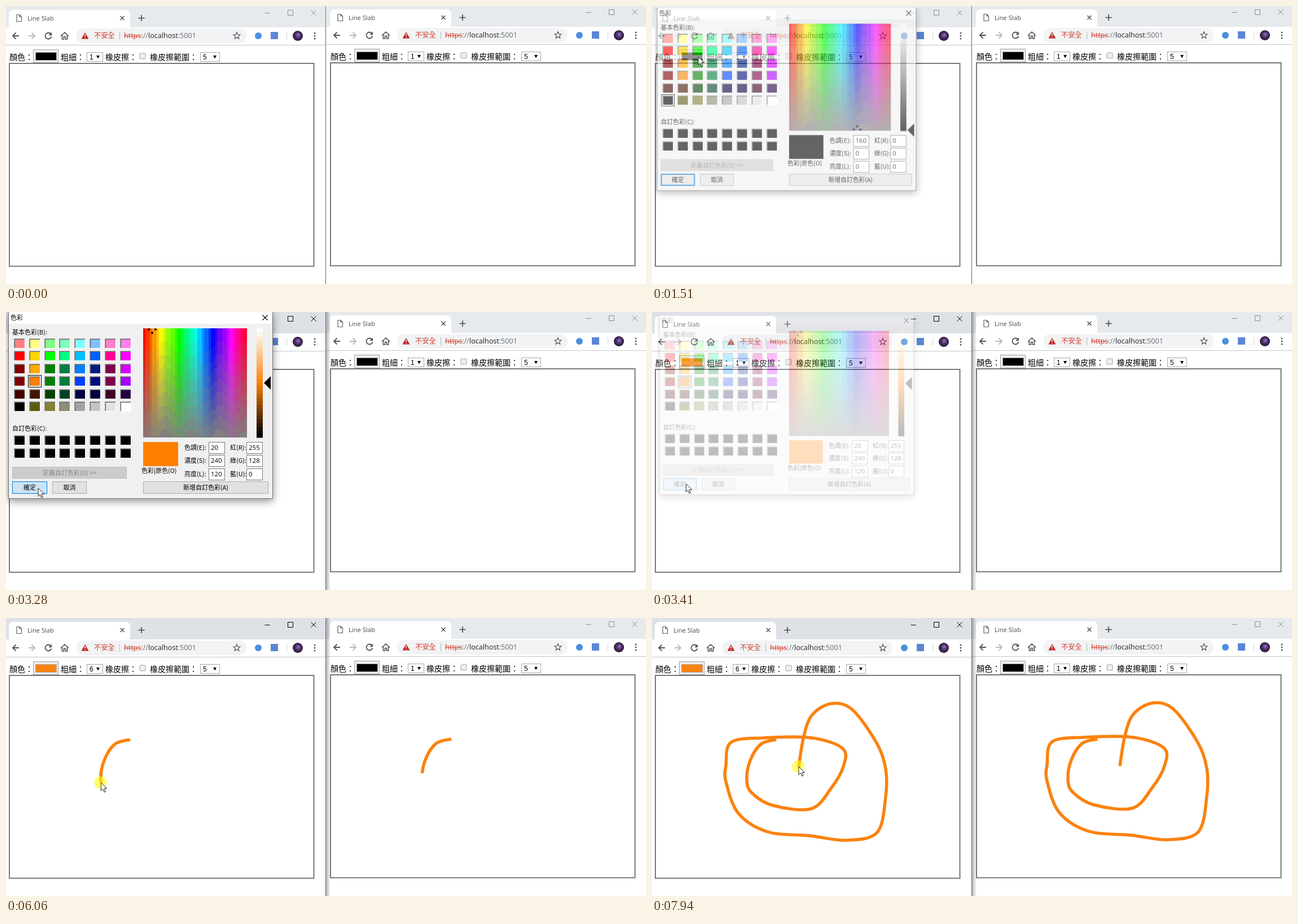
An HTML page with a canvas that plays this animation: 1134 px wide and 494 px high, repeating every 8 s.

```html
<!DOCTYPE html>
<html lang="zh-Hant">
<head>
<meta charset="utf-8">
<title>Line Slab</title>
<style>
  html, body { margin: 0; width: 100%; height: 100%; overflow: hidden; background: #fff; }
  canvas { display: block; }
  svg { position: absolute; left: 0; top: 0; }
</style>
</head>
<body>
<canvas id="stage" width="1134" height="494"></canvas>
<svg width="0" height="0"><path id="trail" fill="none"/></svg>
<script>
const stage = document.getElementById('stage').getContext('2d');
const layer = Object.assign(document.createElement('canvas'), { width: 566, height: 494 }).getContext('2d');
let ctx = stage;

const LOOP = 8000;
const CJK = '"Noto Sans CJK TC", "Noto Sans CJK", "Noto Sans CJK JP", sans-serif';
const UI = '"Open Sans", "Noto Sans", sans-serif';
const ARIAL = '"Liberation Sans", Arial, sans-serif';
const ORANGE = '#fb820f', INK = '#505357';

// Times of the events in ms
const APPEAR = 260, PRESS = 1290, FADE_IN = 1420, PICK = 2200, CLOSE = 3300, FADE = 150;
const OPEN_LIST = 4200, CHOOSE = 4940, DRAW = 5770, DRAW_END = 7900, LAG = 35, CLICK = 80;

// Cursor moves: start, end, x, y
const MOVES = [
  [APPEAR, 820, 82, 90], [1560, 1690, 106, 147], [1690, 2060, 51, 123], [2330, 2900, 57, 313],
  [3340, 3970, 149, 94], [4390, 4430, 157, 121], [4430, 4660, 158, 178], [5020, 5730, 220, 216]
];

// Key points of the hand-drawn line
const KNOTS = `220,216 193,224 174,253 168,288 177,311 214,333 282,339 317,303 339,264 338,232
  283,213 198,213 140,221 131,262 131,291 153,347 205,380 280,387 345,395 399,381 414,318
  414,268 398,222 355,163 318,152 284,172 269,210 260,264`
  .split(/\s+/).map(p => p.split(',').map(Number));

const clamp = v => Math.max(0, Math.min(1, v));
const smooth = v => v * v * (3 - 2 * v);
const mix = (a, b, k) => a + (b - a) * k;

// Catmull-Rom spline as Bezier segments
function spline(points) {
  const at = i => points[Math.max(0, Math.min(points.length - 1, i))];
  const handle = (i, sign) => at(i).map((v, k) => v + sign * (at(i + 1)[k] - at(i - 1)[k]) / 6);
  return points.slice(1).reduce((d, p, i) => `${d}C${handle(i, 1)} ${handle(i + 1, -1)} ${p}`, 'M' + points[0]);
}
const trail = document.getElementById('trail');
const trailShape = spline(KNOTS);
trail.setAttribute('d', trailShape);
const trailPath = new Path2D(trailShape), trailLength = trail.getTotalLength();
const drawnLength = t => trailLength * clamp((t - DRAW) / (DRAW_END - DRAW)) ** 1.3;

function cursorAt(t) {
  if (t >= DRAW) {
    const p = trail.getPointAtLength(drawnLength(t));
    return [p.x, p.y];
  }
  let x = 911, y = 478;
  for (const [from, to, tx, ty] of MOVES) {
    const k = smooth(clamp((t - from) / (to - from)));
    x = mix(x, tx, k);
    y = mix(y, ty, k);
  }
  return [x, y];
}

function rect(x, y, w, h, fill, border) {
  ctx.fillStyle = fill;
  ctx.fillRect(x, y, w, h);
  if (!border) return;
  ctx.strokeStyle = border;
  ctx.lineWidth = 1;
  ctx.strokeRect(x + .5, y + .5, w - 1, h - 1);
}
function round(x, y, w, h, r, fill) {
  ctx.beginPath();
  ctx.roundRect(x, y, w, h, r);
  ctx.fillStyle = fill;
  ctx.fill();
}
function path(d, x, y, stroke, width = 1, fill) {
  const p = new Path2D(d);
  ctx.save();
  ctx.translate(x, y);
  if (fill) { ctx.fillStyle = fill; ctx.fill(p); }
  if (stroke) { ctx.strokeStyle = stroke; ctx.lineWidth = width; ctx.stroke(p); }
  ctx.restore();
}
function disc(x, y, r, fill) {
  ctx.beginPath();
  ctx.arc(x, y, r, 0, 7);
  ctx.fillStyle = fill;
  ctx.fill();
}
function cross(x, y, r, color, width) {
  path(`M${-r} ${-r}L${r} ${r}M${r} ${-r}L${-r} ${r}`, x, y, color, width);
}
function star(x, y) {
  let d = '';
  for (let i = 0; i < 10; i++) {
    const r = i % 2 ? 2.8 : 6.3, a = i * Math.PI / 5;
    d += `${i ? 'L' : 'M'}${r * Math.sin(a)} ${-r * Math.cos(a)}`;
  }
  path(d + 'z', x, y, INK, 1.2);
}
function text(s, x, y, size, color = '#000', family = CJK, align = 'left') {
  ctx.font = `${size}px ${family}`;
  ctx.fillStyle = color;
  ctx.textAlign = align;
  ctx.fillText(s, x, y + size * .37);
}

function select(x, w, value, border = '#a6a6a6') {
  rect(x, 82, w, 17, '#fff', border);
  text(value, x + 5, 90.5, 12, '#000', ARIAL);
  path('M-3-2.5h6L0 3z', x + w - 9, 90.5, null, 0, '#000');
}

function addressBar() {
  const arrow = 'M6 0H-5M.5-5.5L-5 0L.5 5.5';
  path(arrow, 17, 53, INK, 1.8);
  ctx.save();
  ctx.scale(-1, 1);
  path(arrow, -46, 53, '#b8babd', 1.8);
  ctx.restore();
  path('M4.2-3.6A5.5 5.5 0 1 0 5.4 1.2', 75, 53, INK, 1.8);
  path('M6-6.5V-.8H.3z', 75, 53, null, 0, INK);
  path('M-7 .5L0-6L7 .5M-4.6-1V6H-1.5V1.5H1.5V6H4.6V-1', 104, 53, INK, 1.6);
  round(124, 40, 302, 26, 13, '#f1f3f4');
  path('M0-6L6.5 5.5H-6.5z', 140, 53, null, 0, '#c5221f');
  rect(139.3, 50, 1.5, 4, '#fff');
  rect(139.3, 55.5, 1.5, 1.5, '#fff');
  text('不安全', 156, 52.5, 12.3, '#d23f31');
  rect(201, 46, 1, 14, '#b5b8bb');
  let x = 209;
  for (const [part, color] of [['https', '#d23f31'], ['://', '#6b6e72'], ['localhost', '#202124'], [':5001', '#6b6e72']]) {
    text(part, x, 52.5, 12.6, color, UI);
    const w = ctx.measureText(part).width;
    if (part === 'https') rect(x, 53, w, 1, color);
    x += w;
  }
  star(409, 53);
  disc(447, 53, 6, '#4a8fe0');
  rect(469, 46, 13, 13, '#5a86d6');
  rect(497, 46, 1, 14, '#d0d3d6');
  const photo = ctx.createRadialGradient(518, 51, 1, 517, 53, 9);
  photo.addColorStop(0, '#8d68b4');
  photo.addColorStop(.5, '#4a2e68');
  photo.addColorStop(1, '#26182e');
  disc(517, 53, 9, photo);
  for (const dy of [-5, 0, 5]) disc(547, 53 + dy, 1.5, INK);
}

function drawTrail(t) {
  if (t <= DRAW) return;
  ctx.setLineDash([drawnLength(t), trailLength + 9]);
  ctx.strokeStyle = ORANGE;
  ctx.lineWidth = 5.5;
  ctx.stroke(trailPath);
  ctx.setLineDash([]);
}

function browser(x, y, { active, color, size, focus, time }) {
  ctx.save();
  ctx.translate(x, y);
  rect(-1, 0, 567, 496, '#fff');
  rect(-1, -1, 567, 39, active ? '#dee1e6' : '#e7eaed');
  round(5, 7, 215, 40, 8, '#fff');
  rect(-1, 38, 567, 31, '#fff');
  rect(-1, 69, 567, 1, '#c4c6c9');
  path('M-4-6H1L4.5-2.5V6H-4zM1-6V-2.5H4.5', 23, 21.5, '#5f6368', 1.2);
  text('Line Slab', 38, 21.5, 11.2, '#45494d', UI);
  cross(206, 21.5, 3.5, '#45494d', 1.4);
  path('M-5.5 0H5.5M0-5.5V5.5', 240, 21.5, '#45494d', 1.6);
  const control = active ? '#000' : '#8b8d90';
  path('M-4.5.5H4.5', 463, 12, control);
  path('M-4.5-4.5H4.5V4.5H-4.5z', 504, 12, control);
  cross(545, 12, 4.5, control);
  addressBar();

  text('顏色：', 6, 90.5, 14);
  rect(48, 77, 45, 24, '#efefef', '#a0a0a0');
  rect(52, 82, 38, 15, color, '#a9a9a9');
  text('粗細：', 97, 90.5, 14);
  select(143, 29, size, focus ? '#4a7de0' : undefined);
  text('橡皮擦：', 176, 90.5, 14);
  round(236.5, 83.5, 11, 11, 2, '#a3a3a3');
  round(237.5, 84.5, 9, 9, 1, '#eee');
  text('橡皮擦範圍：', 255, 90.5, 14);
  select(344, 35, '5');
  ctx.strokeStyle = '#777';
  ctx.lineWidth = 2;
  ctx.strokeRect(6, 102, 539.5, 360.5);
  drawTrail(time);
  ctx.restore();
}

function button(x, y, w, h, label, fill = '#e1e1e1', border = '#adadad', ink = '#000') {
  rect(x, y, w, h, fill, border);
  text(label, x + w / 2, y + h / 2, 11, ink, CJK, 'center');
}

function swatch(x, y, color) {
  rect(x - 10, y - 9, 20, 18, '#fff');
  rect(x - 10, y - 9, 19, 17, '#a0a0a0');
  rect(x - 9, y - 8, 18, 16, '#696969');
  rect(x - 8, y - 7, 17, 15, color);
}

// Hues run across the columns; rows go from pastel to dark, the last is a grey ramp
function basicColor(i, j) {
  if (j === 5) return `hsl(60 ${Math.max(0, 100 - 30 * i)}% ${100 * (i / 7) ** .8}%)`;
  const hue = [0, 60 - 10 * j, 120, 150, 180 + 15 * j, 210 + 8 * j, 325, 310 - 10 * j][i];
  const light = j < 2 ? 75 - 25 * j : j === 4 ? 13 : i % 3 === 1 ? 50 : 25;
  return `hsl(${hue} 100% ${light}%)`;
}

function spectrum() {
  for (let x = 0; x < 184; x += 4) {
    for (let y = 0; y < 194; y += 6) {
      const hue = Math.round(x / 184 * 30) * 12;
      const wobble = Math.sin(x * 1.7) * 5;
      const sat = clamp(Math.round((106 - y / 194 * 104 + wobble) / 12) * .12);
      rect(243 + x, 29 + y, 4, Math.min(6, 194 - y), `hsl(${hue} ${sat * 100}% 50%)`);
    }
  }
}

function dialog(picked, hover) {
  const color = picked ? '#ff8000' : '#000';
  ctx.save();
  ctx.shadowColor = 'rgba(0,0,0,.45)';
  ctx.shadowBlur = 14;
  ctx.shadowOffsetY = 4;
  rect(4, -2, 469, 334, '#f0f0f0');
  ctx.restore();
  rect(4, -2, 469, 334, '#f0f0f0', '#707070');
  rect(5, -2, 467, 23, '#fff');
  text('色彩', 8, 9.5, 11);
  cross(459, 10, 4.5, '#000', 1.1);

  const column = i => Math.round(24 + 26.8 * i), row = j => Math.round(56 + 22.4 * j);
  text('基本色彩(B):', 11, 36, 11);
  const [ci, cj] = picked ? [1, 3] : [0, 5];
  rect(column(ci) - 12, row(cj) - 11, 24, 22, '#f0f0f0', '#000');
  for (let i = 0; i < 8; i++) {
    for (let j = 0; j < 6; j++) swatch(column(i), row(j), basicColor(i, j));
    for (const y of [228, 251]) swatch(column(i), y, '#000');
  }
  text('自訂色彩(C):', 11, 207, 11);

  button(11, 275, 203, 21, '定義自訂色彩(D) >>', '#ccc', '#bfbfbf', '#858585');
  button(11, 301, 62, 22, '確定', hover ? '#cce4f7' : '#e1e1e1', '#0078d7');
  if (!hover) rect(12, 302, 60, 20, 'transparent', '#0078d7');
  button(82, 301, 61, 22, '取消');
  button(243, 301, 222, 22, '新增自訂色彩(A)');

  spectrum();
  ctx.save();
  ctx.beginPath();
  ctx.rect(243, 29, 184, 194);
  ctx.clip();
  path('M-8 0H-4M4 0H8M0-8V-4M0 4V8', picked ? 259 : 366, picked ? 31 : 221, '#000', 3);
  ctx.restore();
  for (let i = 0; i < 30; i++) {
    rect(444, 29 + i * 194 / 30, 11, 7, `hsl(30 ${picked ? 100 : 0}% ${100 - i / 29 * 100}%)`);
  }
  path('M0 0L12-12V12z', 457, picked ? 126 : 222, null, 0, '#000');

  rect(243, 231, 62, 43, color);
  text('色彩|原色(O)', 240, 282, 11);
  const values = picked ? [20, 240, 120, 255, 128, 0] : [160, 0, 0, 0, 0, 0];
  ['色調(E):', '濃度(S):', '亮度(L):', '紅(R):', '綠(G):', '藍(U):'].forEach((label, i) => {
    const right = i > 2, y = 240.5 + i % 3 * 23.5, x = right ? 426 : 359;
    text(label, right ? 397 : 316, y, 11);
    rect(x, Math.round(y - 10), 29, 21, '#fff', '#7a7a7a');
    text(values[i], x + 4, y, 11.5, '#000', UI);
  });
}

// The dialog fades and grows as one picture
function showDialog(t) {
  const alpha = Math.min(clamp((t - FADE_IN) / FADE), clamp(1 - (t - CLOSE) / FADE));
  if (!alpha) return;
  ctx = layer;
  ctx.clearRect(0, 0, 566, 494);
  dialog(t >= PICK, t > 2850);
  ctx = stage;
  const scale = .95 + .05 * alpha;
  ctx.save();
  ctx.globalAlpha = alpha;
  ctx.translate(238, 150);
  ctx.scale(scale, scale);
  ctx.drawImage(layer.canvas, -238, -150);
  ctx.restore();
}

function dropdown(y) {
  rect(143, 99, 29, 107, '#fff', '#7b93d8');
  const hovered = Math.max(0, Math.floor((y - 100) / 15));
  for (let i = 0; i < 7; i++) {
    const on = i === hovered;
    if (on) rect(144, 100 + i * 15, 27, 15, '#4380f4');
    text(i + 1, 148, 107.5 + i * 14.9, 12, on ? '#fff' : '#000', ARIAL);
  }
}

function pointer(t, x, y) {
  const pressed = t >= DRAW || [PRESS, PICK, CLOSE - 120, OPEN_LIST, CHOOSE].some(c => t >= c && t < c + CLICK);
  if (pressed) disc(x - 1, y, 11, 'rgba(255,255,0,.58)');
  path('M0 0V14.5L3.4 11.4L5.8 17L8.2 16L5.8 10.5H10.3z', x, y, '#222', 1, '#fff');
}

function render(t) {
  const active = (t >= PRESS && t < FADE_IN) || t >= CLOSE - 50;
  const chosen = t >= CHOOSE + CLICK;
  const [x, y] = cursorAt(t);
  rect(0, 0, 1134, 494, '#fff');
  browser(569, -1, { color: '#000', size: '1', time: t - LAG });
  browser(0, 0, {
    active,
    color: t >= CLOSE + FADE / 2 ? ORANGE : '#000',
    size: chosen ? '6' : '1',
    focus: t >= OPEN_LIST && t < DRAW,
    time: t
  });
  rect(566, 0, 1, 494, '#666');
  if (active) {
    const shade = ctx.createLinearGradient(567, 0, 575, 0);
    shade.addColorStop(0, 'rgba(0,0,0,.3)');
    shade.addColorStop(1, 'rgba(0,0,0,0)');
    rect(567, 0, 8, 494, shade);
  }
  showDialog(t);
  if (t >= OPEN_LIST && !chosen) dropdown(y);
  if (t >= APPEAR) pointer(t, x, y);
}

const start = performance.now();
function tick() {
  render((performance.now() - start) % LOOP);
  requestAnimationFrame(tick);
}
tick();
</script>
</body>
</html>
```
